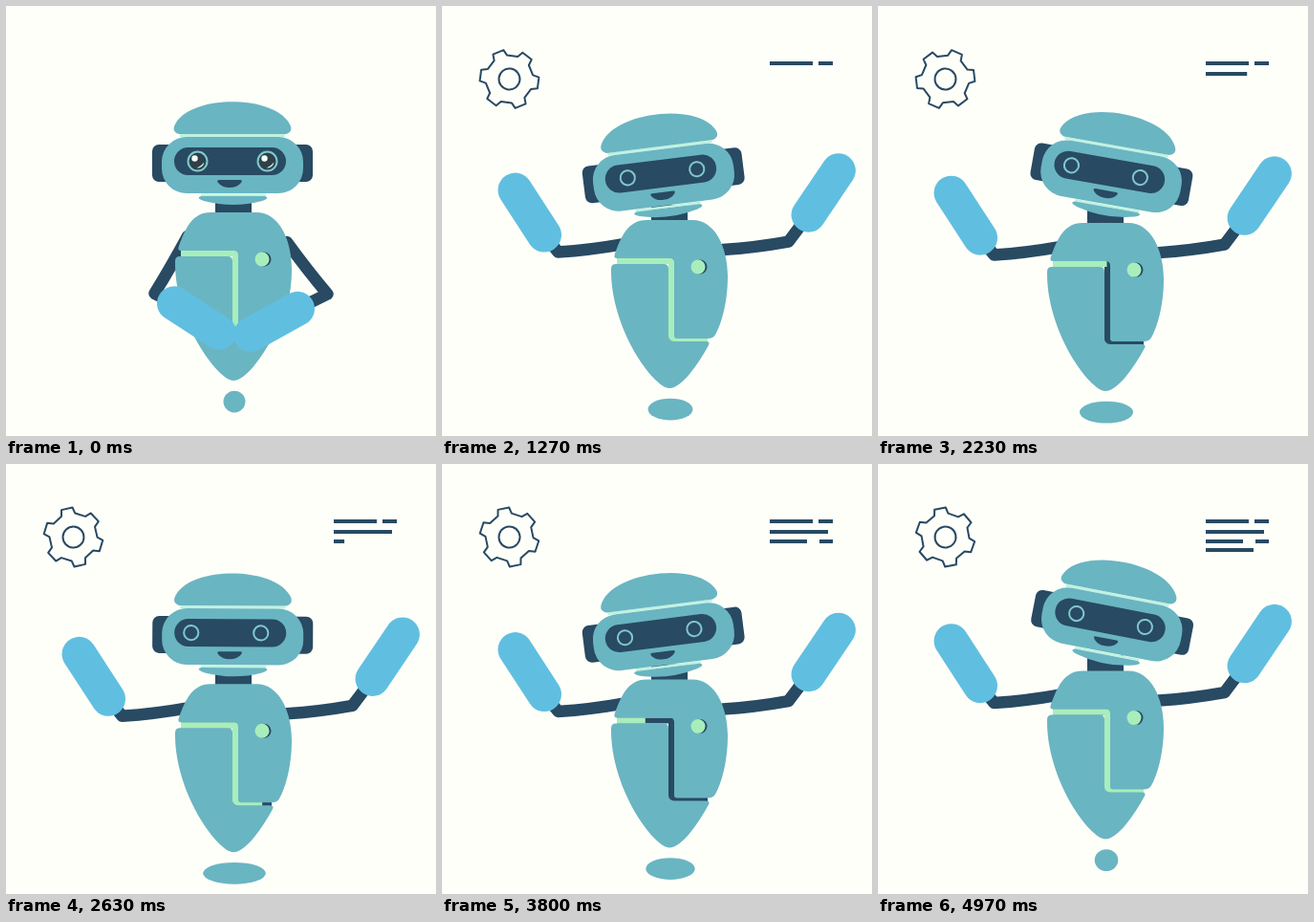
Animation, 450 px wide and 450 px high, one loop 5.01 s. Source, as an HTML page:

```html
<!DOCTYPE html>
<html lang="en">
<head>
<meta charset="utf-8">
<title>Robot</title>
<style>
  html, body { margin: 0; width: 100%; height: 100%; overflow: hidden; background: #fffffa; }
  svg { display: block; width: 100vw; height: 100vh; }
  .teal { fill: #6ab5c2; }
  .dark { fill: #284a62; }
  .line { fill: none; stroke: #284a62; }
  .glow { fill: none; stroke: #a8eebb; }
  .rim { fill: none; stroke: #c0f2e0; }
  .arm { stroke-width: 12.5; stroke-linecap: round; stroke-linejoin: round; }
  .hand { stroke: #60bfe0; stroke-width: 36; stroke-linecap: round; }
</style>
</head>
<body>
<svg viewBox="0 0 450 450">
  <defs>
    <clipPath id="frame"><rect width="438" height="450"/></clipPath>
    <g id="pupil">
      <circle r="8.5" fill="#30404a"/>
      <circle cx="-3" cy="-3" r="3.2" fill="#f4fff8"/>
      <path d="M7 1Q6 7-1 7Q4 5 7 1Z" fill="#d6f5e4"/>
    </g>
  </defs>
  <g clip-path="url(#frame)">
    <g id="gear" class="line" stroke-width="2" stroke-linejoin="round">
      <path id="teeth"/><circle r="11"/>
    </g>
    <g id="code" class="line" stroke-width="4"></g>
    <ellipse id="shadow" class="teal" cx="239" ry="11.4"/>
    <g id="robot">
      <path id="armL" class="line arm"/>
      <path id="armR" class="line arm"/>
      <rect class="dark" x="219" y="200" width="38" height="20"/>
      <path class="line" stroke-width="6" d="M183 259H240V341H278"/>
      <path id="seam" class="glow" stroke-width="6" pathLength="1" d="M183 259H240V341H278"/>
      <path class="teal" d="M183 256Q179 256 181 251C187 235 194 216 214 216H262C286 216 299 245 299 275C299 303 292 326 286 336Q284 340 278 340H246Q243 340 243 337V261Q243 256 238 256Z"/>
      <path class="teal" d="M182 262H232Q237 262 237 267V338Q238 343 244 343H276Q281 343 279 347C268 367 251 392 238 392C222 392 176 330 177 267Q177 262 182 262Z"/>
      <circle class="dark" cx="270" cy="265" r="7.5"/>
      <circle cx="268" cy="265" r="7.5" fill="#a8eebb"/>
      <g id="head">
        <rect class="dark" x="153" y="145" width="168" height="39" rx="7"/>
        <path class="rim" stroke-width="3" d="M182 135.5H292M204 198H272"/>
        <path class="teal" d="M181 134Q172 131 178 122C196 93 278 93 296 122Q302 131 293 134Z"/>
        <rect class="teal" x="163" y="137" width="148" height="59" rx="26"/>
        <path class="teal" d="M204 199H271Q277 201 268 204Q238 212 207 204Q198 201 204 199Z"/>
        <rect class="dark" x="176" y="148" width="117" height="29" rx="14.5"/>
        <path class="dark" d="M223 182H245Q248 182 246 185Q242 190 234 190Q226 190 222 185Q220 182 223 182Z"/>
        <g id="eyes">
          <g id="pupils">
            <use href="#pupil" x="200.5" y="162.5"/><use href="#pupil" x="273.5" y="162.5"/>
          </g>
          <g fill="none" stroke="#80c8cc" stroke-width="2">
            <circle class="ring" cx="200.5" cy="162.5"/><circle class="ring" cx="273.5" cy="162.5"/>
          </g>
        </g>
      </g>
      <path id="handL" class="hand"/>
      <path id="handR" class="hand"/>
    </g>
  </g>
</svg>
<script>
const LOOP = 5010, BOB = 5000 / 3;
const $ = id => document.getElementById(id);
const set = (id, name, value) => $(id).setAttribute(name, value);
const clamp = p => Math.min(1, Math.max(0, p));
const ease = p => p * p * (3 - 2 * p);
const mix = (a, b, p) => a + (b - a) * p;
const polar = ([x, y], r, deg) => [x + r * Math.cos(deg * Math.PI / 180), y + r * Math.sin(deg * Math.PI / 180)];

// Eased value between [time, value] keys
function keyed(t, keys) {
  const i = keys.findIndex(k => k[0] > t);
  if (i < 0) return keys[keys.length - 1][1];
  const [t0, a] = keys[i - 1], [t1, b] = keys[i];
  return mix(a, b, ease((t - t0) / (t1 - t0)));
}

const TILT = [[0, 0], [650, -7.2], [1250, -7.2], [2100, 11], [3050, -7.2], [4240, -7.2], [4930, 11]];
const GAZE = [[0, 0], [900, 0], [2500, -7], [3400, -6.5], [4200, -1], [4970, -2]];

// Code rows: y, start time, [from, to] dashes
const ROWS = [
  [60, 60, [343, 388], [394, 409]],
  [71, 1545, [343, 404]],
  [81, 2455, [343, 382], [395, 409]],
  [90, 4025, [343, 393]]
];
$('code').innerHTML = '<path/>'.repeat(ROWS.length);

const points = [];
for (let a = -90; a < 270; a += 60)
  for (const [d, r] of [[-17, 25], [-11, 31], [11, 31], [17, 25]]) points.push(polar([0, 0], r, a + d));
set('teeth', 'd', 'M' + points.join('L') + 'Z');

function arm(side, shoulder, upperLen, upper, gap, bend, fore) {
  const elbow = polar(shoulder, upperLen, upper);
  const wrist = polar(elbow, gap, fore + bend);
  const sag = [(shoulder[0] + elbow[0]) / 2, (shoulder[1] + elbow[1]) / 2 + 2];
  set('arm' + side, 'd', `M${shoulder}Q${sag} ${elbow}L${wrist}`);
  set('hand' + side, 'd', `M${wrist}L${polar(wrist, 56, fore)}`);
}

function draw(t) {
  const phase = t % BOB;
  const lift = phase < 880 ? (phase / 880) ** .82 : 1 - (phase - 880) / (BOB - 880);
  const y = 16 * lift;
  set('robot', 'transform', `translate(0 ${y})`);
  set('shadow', 'cy', 414 + y);
  set('shadow', 'rx', 11.4 + 24 * lift);

  const open = ease(clamp(t / 970));
  arm('L', [190, 241], 69, mix(120, 173, open), 23, -6, mix(33, 237, open));
  arm('R', [294, 247], 69, mix(52, -7, open), 35, 3, mix(151, -56, open));

  const tilt = keyed(t, TILT);
  set('head', 'transform', `translate(0 ${Math.max(0, -tilt) * .6}) rotate(${tilt} 237 207)`);
  set('eyes', 'transform', `translate(${keyed(t, GAZE)} 0)`);
  const calm = clamp((t - 1000) / 250);
  set('pupils', 'opacity', 1 - calm);
  document.querySelectorAll('.ring').forEach(ring => ring.setAttribute('r', mix(10, 7.6, calm)));

  // The seam empties and refills once per bob
  const lit = phase < 360 ? clamp((360 - phase) / 160) : clamp((phase - 360) / 640);
  set('seam', 'stroke-dasharray', `${lit} 2`);

  // One turn per second
  const pop = ease(clamp((t - 30) / 400));
  set('gear', 'transform', `translate(70.5 76.5) rotate(${t * .36}) scale(${pop})`);

  ROWS.forEach(([rowY, start, ...dashes], i) => {
    const end = 343 + Math.max(0, t - start) * .063;
    const d = dashes.filter(([a]) => end > a).map(([a, b]) => `M${a} ${rowY}H${Math.min(b, end)}`);
    $('code').children[i].setAttribute('d', d.join(''));
  });
}

const begin = performance.now();
function tick() {
  draw(Math.max(0, performance.now() - begin) % LOOP);
  requestAnimationFrame(tick);
}
tick();
</script>
</body>
</html>
```
